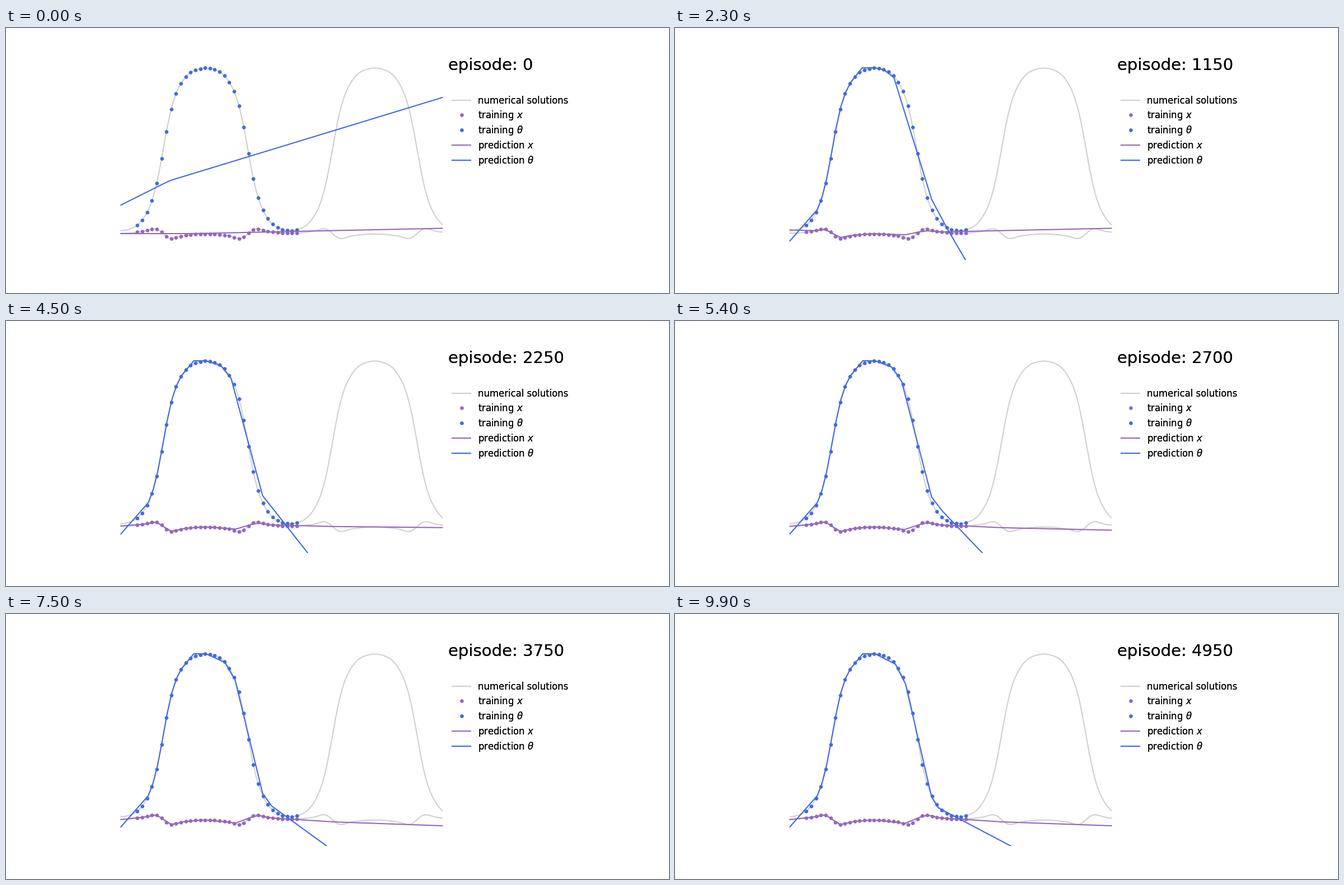
A matplotlib script that plays this animation: 1183x473 px, repeating every 10 s.

```python
import numpy as np
import matplotlib.pyplot as plt
from matplotlib.animation import FuncAnimation
from matplotlib.patches import Rectangle

W, H, DPI = 1183, 473, 100
FRAMES, INTERVAL, STEP = 100, 100, 50
GRAY, PURPLE, BLUE = "#d0d0d0", "#9467bd", "#4169e1"
LEFT, RIGHT, FLOOR = 205, 778.5, 413.5
PEAK, HALF = 356, 151    # first peak of the angle, half a period
WARMUP = 9               # frames until the angle fit has found the hump

plt.rcParams["font.family"] = "DejaVu Sans"
plt.rcParams["mathtext.fontset"] = "dejavusans"


def px(size):
    return size * 72 / DPI


def swing(x, mean, amps):
    """Sum of odd cosine harmonics around a mean height."""
    phi = np.pi * (np.asarray(x) - PEAK) / HALF
    return mean + sum(a * np.cos((2 * k + 1) * phi) for k, a in enumerate(amps))


def angle(x):
    return swing(x, 216.6, (-163.0, 21.9, -5.06, 1.65, -0.6))


def position(x):
    return swing(x, 367, (3.7, -4.7, 2.55, -1.3, 0.45))


def angle_fit(frame):
    """Polyline that hugs the first hump, then leaves it on a straight tail."""
    t = max(frame, WARMUP)
    lag = np.exp(-(t - WARMUP) / 6)
    grip = 414 - 35 * np.exp(-(t - WARMUP) / 35)

    def track(*values):
        return np.interp(t, [WARMUP, 23, 45, 99], values)

    foot = np.array([track(492, 484, 479, 470), track(331, 355, 338.5, 346)])
    tail = track(545, 518, 538, 598)
    slope = (FLOOR - foot[1]) / (tail - foot[0])

    rise = np.linspace(254, 313, 8)
    pts = np.array([
        (LEFT, 380),
        *zip(rise, angle(rise)),
        (335 - 12 * lag, 71 + 2 * lag),
        (357, 71),
        (grip - 18, angle(grip - 18)),
        (grip, angle(grip) + 21 * lag),
        (458, track(259, 306, 312, 327)),
        foot,
        (RIGHT, foot[1] + slope * (RIGHT - foot[0])),
    ])
    x, y = pts.T
    dx = x - 292
    untrained = 272.5 + np.maximum(-0.305 * dx, -0.5 * dx)
    k = min(frame / WARMUP, 1)
    return x, untrained + k * (y - untrained)


def position_fit(frame):
    """Flat start that settles on the samples, left part first."""
    x = np.array([LEFT, 250, 268, 295, 320, 355, 410, 436, 450, 475, 525, 585, RIGHT])
    dip = 12 * frame / 9 * np.exp(1 - frame / 9)
    base = 367 - 0.0212 * np.maximum(x - 330, 0) - dip * np.clip((290 - x) / 40, 0, 1)
    drift = np.clip((frame - 23) / 40, 0, 1)
    base += drift * np.interp(x, [475, 585, RIGHT], [0, 9.5, 20.5])
    pace = np.interp(x, [320, 410], [16, 45])
    trained = (x > 240) & (x < 480)
    weight = np.where(trained, 1 - np.exp(-frame / pace), 0)
    return x, base + weight * (position(x) - base)


fig = plt.figure(figsize=(W / DPI, H / DPI), dpi=DPI, facecolor="white")
ax = fig.add_axes([0, 0, 1, 1])
ax.set(xlim=(0, W), ylim=(H, 0))
ax.axis("off")


def line(x, y, color, z=3):
    return ax.plot(x, y, color=color, lw=1.5, zorder=z)[0]


def dots(x, y, color):
    ax.plot(x, y, "o", color=color, ms=px(6.6), mew=0, zorder=2)


def heavy_text(x, y, label, size):
    """Text drawn twice, which makes its edges slightly heavier."""
    return [ax.text(x, y, label, fontsize=size, va="baseline") for _ in range(2)]


xs = np.linspace(LEFT, RIGHT, 600)
samples = np.linspace(234.5, 519, 34)
for curve, color in ((position, PURPLE), (angle, BLUE)):
    line(xs, curve(xs), GRAY, 1)
    dots(samples, curve(samples), color)

x_line = line([], [], PURPLE)
angle_line = line([], [], BLUE, 4)
angle_line.set_clip_path(Rectangle((0, 0), W, FLOOR, transform=ax.transData))

LEGEND = [
    (129, "numerical solutions", GRAY, True),
    (155, "training $x$", PURPLE, False),
    (182, r"training $\theta$", BLUE, False),
    (209, "prediction $x$", PURPLE, True),
    (236, r"prediction $\theta$", BLUE, True),
]
for y, label, color, is_line in LEGEND:
    if is_line:
        line([796.5, 829], [y, y], color)
    else:
        dots([813], [y], color)
    heavy_text(842, y + 5.8, label, px(16.5))

titles = heavy_text(789.5, 75, "", 21)


def update(frame):
    x_line.set_data(*position_fit(frame))
    angle_line.set_data(*angle_fit(frame))
    for title in titles:
        title.set_text(f"episode: {frame * STEP}")
    return x_line, angle_line, *titles


anim = FuncAnimation(fig, update, frames=FRAMES, interval=INTERVAL,
                     repeat=True, repeat_delay=0, blit=False)
plt.show()
```
